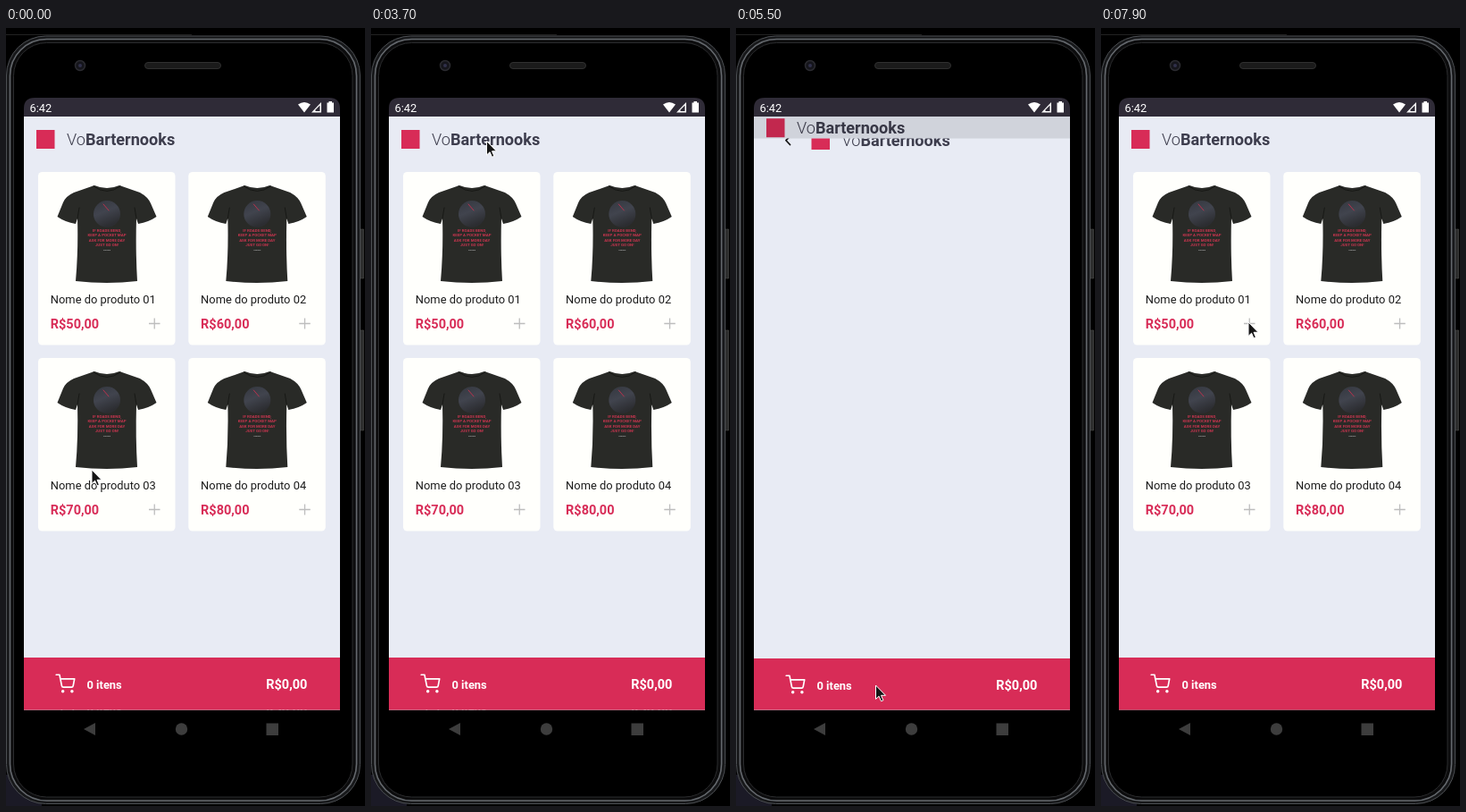
These frames come from a looping animation (402 px wide and 870 px high, 8000 ms). An HTML page:

```html
<!DOCTYPE html>
<html lang="pt-BR">
<head>
<meta charset="utf-8">
<title>Loja</title>
<style>
  html, body { margin: 0; width: 100%; height: 100%; overflow: hidden; background: #000; }
  svg { display: block; }
  text { font-family: Roboto, sans-serif; }
  .bold { font-weight: 700; }
  .name { font-size: 12.9px; fill: #1c1c1c; }
  .price { font-size: 14.5px; fill: #d82c57; font-weight: 700; }
  .brand { font-size: 18.1px; fill: #3d3d4d; font-weight: 300; }
  .print { font: 700 4.4px Lato, sans-serif; fill: #c8354f; text-anchor: middle; }
  .line { fill: none; stroke-linecap: round; stroke-linejoin: round; }
</style>
</head>
<body>
<svg width="402" height="870" viewBox="0 0 402 870">
  <defs>
    <linearGradient id="moon" x2="0.4" y2="1">
      <stop stop-color="#34373f"/><stop offset=".5" stop-color="#41444e"/><stop offset="1" stop-color="#2c2d31"/>
    </linearGradient>
    <g id="shirt">
      <path fill="#292a27" d="M99 176Q113 182 127 176L150 184Q159 189 162 196L168.500 211Q160 217 148 219L146 213Q145 250 147 283Q113 287 78 283Q81 250 80 213L78 219Q66 217 57.500 211L64 195Q67 188 76 184Z"/>
      <path class="line" stroke="#171815" d="M98 177Q113 188 128 177M80 213L82 201M146 213L144 201"/>
      <circle cx="113" cy="208" r="15" fill="url(#moon)"/>
      <path class="line" stroke="#b8324d" d="M109 197L115 204"/>
      <g class="print">
        <text x="113" y="227.500">IF ROADS BEND,</text>
        <text x="113" y="233">KEEP A POCKET MAP</text>
        <text x="113" y="238.500">ASK FOR MORE DAY</text>
        <text x="113" y="244">JUST GO ON!</text>
        <text x="113" y="249" style="font-size:2.500px;fill:#aaa">sample</text>
      </g>
    </g>
    <g id="header">
      <rect x="34" y="114" width="20.500" height="21" fill="#d82c57"/>
      <text class="brand" x="68" y="131">Vo<tspan class="bold">Barternooks</tspan></text>
    </g>
    <g id="cartButton">
      <g class="line" stroke="#fff" stroke-width="1.800" transform="translate(55.300 722.300) scale(.93)">
        <circle cx="9" cy="21" r="1"/><circle cx="20" cy="21" r="1"/>
        <path d="M1 1h4l2.680 13.390a2 2 0 0 0 2 1.610h9.720a2 2 0 0 0 2-1.610L23 6H6"/>
      </g>
      <text class="bold" x="90.500" y="738.500" font-size="12.900" fill="#fff">0 itens</text>
    </g>
    <g id="footer">
      <rect x="20" y="704" width="354" height="60" fill="#d82c57"/>
      <text class="price" x="291.300" y="739" style="fill:#fff">R$0,00</text>
    </g>
    <clipPath id="revealClip"><rect id="revealRect" x="20" width="354" height="664"/></clipPath>
  </defs>

  <!-- phone -->
  <path fill="#1b1a26" d="M0 835H40V870H0Z"/>
  <path stroke="#222" d="M0 7.500H208"/>
  <path fill="#2e2f2f" stroke="#4a4a48" stroke-width=".6" d="M396 225h4.500v55h-4.500zM396 338h4.500v112h-4.500z"/>
  <rect x=".5" y="9" width="396" height="858.500" rx="44" fill="#17181a" stroke="#4c4f53"/>
  <rect x="4.500" y="12.500" width="388" height="851.500" rx="41" fill="#0c0c0d" stroke="#65696e" stroke-width="1.600"/>
  <rect x="8.500" y="16.500" width="379.500" height="843.500" rx="37" fill="#000" stroke="#2b2c2e"/>
  <rect x="155.500" y="38.500" width="85" height="7" rx="3.500" fill="#1b1b1b" stroke="#303030"/>
  <circle cx="83" cy="42" r="5.500" fill="#15151b" stroke="#2b2b30" stroke-width="1.500"/>
  <circle cx="83" cy="42" r="2" fill="#30304a"/>

  <!-- system bars -->
  <path fill="#2f2b37" d="M20 99V90Q20 78 32 78H362Q374 78 374 90V99Z"/>
  <text x="26.500" y="93.500" font-size="12.900" fill="#fff">6:42</text>
  <path fill="#fff" d="M327 85.500Q334 80.500 341 85.500L334 94.500ZM353 83V94.500H342ZM361.500 82h3.500v1.500h2v11h-7.500v-11h2z"/>
  <path fill="#2f2b37" d="M346.500 91.500L351.500 86.500V93H346.500Z"/>
  <path fill="#3d3d3d" d="M87 784L100 777V791ZM291.500 777.500H305V791H291.500Z"/>
  <circle cx="196.500" cy="784" r="6.700" fill="#3d3d3d"/>

  <!-- app -->
  <svg x="20" y="99" width="354" height="663.500" viewBox="20 99 354 663.500">
    <g id="home">
      <path fill="#e8ebf4" d="M20 99H374V780H20Z"/>
      <use href="#header"/>
      <g id="cards"></g>
      <use href="#footer"/>
      <use href="#cartButton" id="homeButton"/>
    </g>
    <rect id="shade" x="20" y="99" width="354" height="664"/>
    <g clip-path="url(#revealClip)">
      <g id="cart">
        <path fill="#e8ebf4" d="M20 90H374V780H20Z"/>
        <circle id="ripple" cx="58.300" cy="124.500" r="13"/>
        <path class="line" stroke="#111" stroke-width="1.700" d="M60.500 120L56 124.700L60.500 129.500"/>
        <use href="#header" x="50.500"/>
        <use href="#footer"/>
        <use href="#cartButton"/>
      </g>
    </g>
  </svg>
  <path id="cursor" fill="#151515" stroke="#fff" d="M0 0V15.500L3.600 12.200L6 17.800L8.400 16.800L6 11.300H11Z"/>
</svg>
<script>
const LOOP = 8000, HEIGHT = 663.5, TOP = 99;
const OPEN = 5258, CLOSE = 6955, SLIDE = 425;
const el = id => document.getElementById(id);
const clamp = x => Math.max(0, Math.min(1, x));

// time, x, y of the pointer tip
const pointer = [
  [0, 96, 494], [100, 96, 494], [400, 107, 446], [1650, 107, 446], [1900, 117, 451],
  [2250, 181, 385], [2500, 177, 355], [3000, 166.5, 329], [3300, 166.5, 329],
  [3700, 129.5, 126.5], [3800, 129.5, 126.5], [3900, 109.5, 130], [4000, 109.5, 130],
  [4300, 185, 420], [4500, 218, 750], [4600, 205, 795], [4800, 156.5, 735],
  [5700, 156.5, 735], [6100, 202, 290], [6400, 95, 160], [6700, 51, 118.5],
  [7000, 51, 118.5], [7400, 191, 222], [7500, 191, 222], [7900, 165, 329], [8000, 165, 329]
];

el('cards').innerHTML = [50, 60, 70, 80].map((price, i) => `
  <g transform="translate(${i % 2 * 168.3} ${(i >> 1) * 208})">
    <rect x="36" y="161" width="153.500" height="193.500" rx="4.500" fill="#fffffc"/>
    <use href="#shirt"/>
    <text class="name" x="49.800" y="307.500">Nome do produto 0${i + 1}</text>
    <text class="price" x="49.800" y="336">R$${price},00</text>
    <path stroke="#bdbdbd" stroke-width="1.300" d="M160 330.500H172.500M166.250 324.500V336.500"/>
  </g>`).join('');

function ease(x) {
  const bezier = (s, a, b) => 3 * (1 - s) ** 2 * s * a + 3 * (1 - s) * s * s * b + s ** 3;
  let low = 0, high = 1;
  for (let i = 0; i < 24; i++) {
    const mid = (low + high) / 2;
    if (bezier(mid, 0.20833, 0.25) < x) low = mid; else high = mid;
  }
  return bezier(high, 0.82, 1);
}

// Slope at a key; zero where the pointer rests on either side
function slope(i, axis) {
  const a = pointer[i - 1], b = pointer[i], c = pointer[i + 1];
  const rests = (p, q) => !p || !q || (p[1] === q[1] && p[2] === q[2]);
  return rests(a, b) || rests(b, c) ? 0 : (c[axis] - a[axis]) / (c[0] - a[0]);
}

function pointerAt(t, axis) {
  const i = pointer.findIndex(key => key[0] > t) - 1;
  const a = pointer[i], b = pointer[i + 1], span = b[0] - a[0], u = (t - a[0]) / span;
  return a[axis] + (b[axis] - a[axis]) * u * u * (3 - 2 * u)
    + span * u * (1 - u) * ((1 - u) * slope(i, axis) - u * slope(i + 1, axis));
}

function draw(now) {
  const t = now % LOOP;
  const shown = t < CLOSE ? ease(clamp((t - OPEN) / SLIDE)) : 1 - ease(clamp((t - CLOSE) / SLIDE));
  const gap = HEIGHT * (1 - shown);
  el('home').setAttribute('transform', `translate(0 ${-0.02 * HEIGHT * shown})`);
  el('shade').setAttribute('opacity', 0.1 * clamp(shown / 0.36));
  el('revealRect').setAttribute('y', TOP + gap);
  el('cart').setAttribute('transform', `translate(0 ${gap * 0.041})`);
  el('homeButton').setAttribute('opacity', t < 5050 ? 1 : 0.2 + 0.8 * clamp((t - OPEN) / 250));
  el('ripple').setAttribute('opacity', t < 6850 ? 0 : 0.32 * (1 - clamp((t - CLOSE) / 200)));
  el('cursor').setAttribute('transform', `translate(${pointerAt(t, 1)} ${pointerAt(t, 2)})`);
}

const start = performance.now();
(function tick() {
  draw(performance.now() - start);
  requestAnimationFrame(tick);
})();
</script>
</body>
</html>
```
